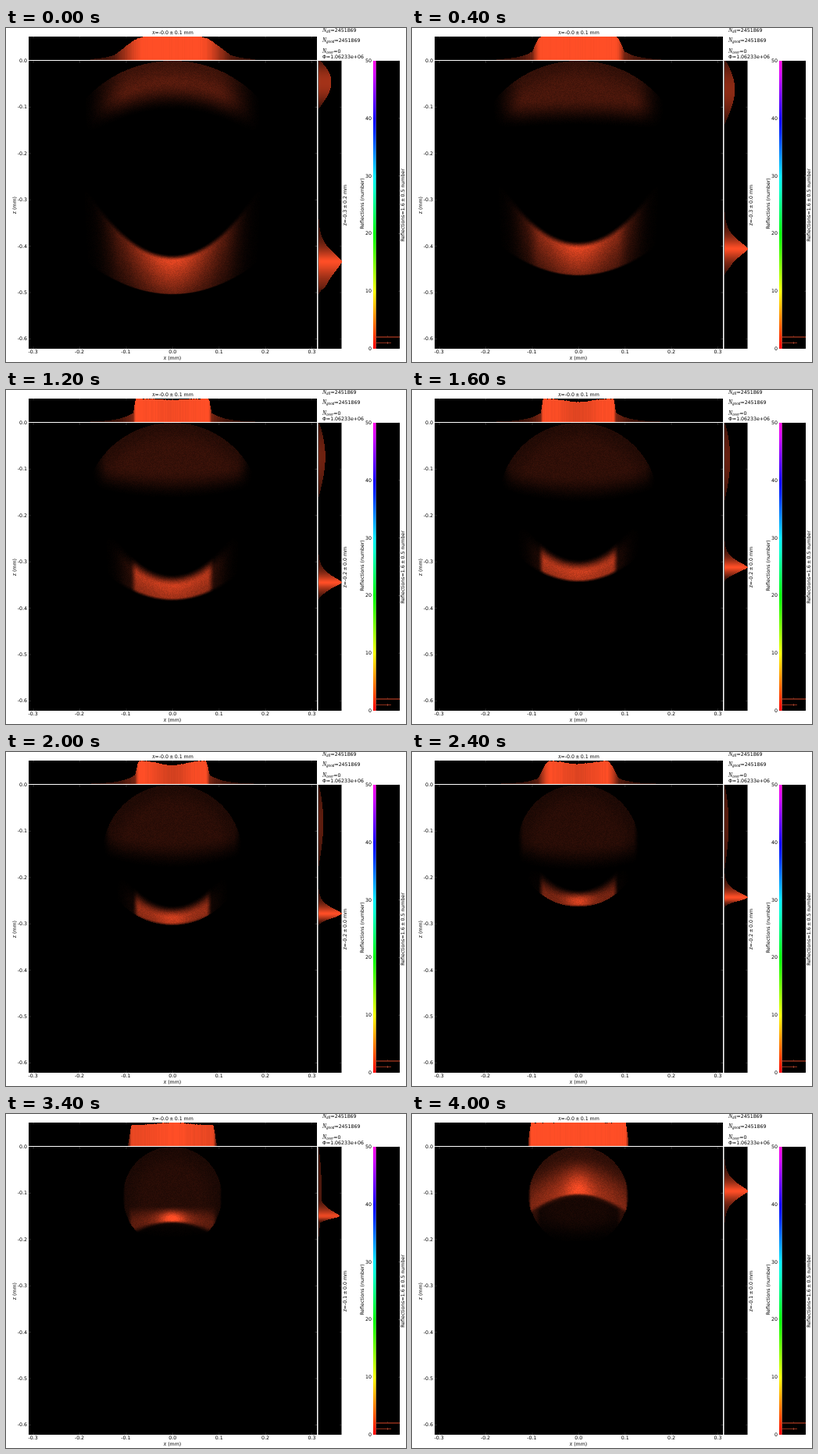
An HTML page with a canvas that plays this animation: 512 px wide and 428 px high, repeating every 4100 ms.

```html
<!DOCTYPE html>
<html lang="en">
<head>
<meta charset="utf-8">
<title>Beam cross-section</title>
<style>
html, body { margin: 0; width: 512px; height: 428px; overflow: hidden; background: #fff; }
svg, canvas { position: absolute; left: 0; top: 0; width: 512px; height: 428px; }
text { font: 6.25px "DejaVu Sans", sans-serif; fill: #000; white-space: pre; }
.m { font: italic 7.5px "Liberation Serif", serif; }
.s { font: italic 5.2px "Liberation Serif", serif; }
.mid { text-anchor: middle; }
.end { text-anchor: end; }
</style>
</head>
<body>
<svg id="plot" viewBox="0 0 512 428">
  <defs><linearGradient id="hues" x1="0" y1="1" x2="0" y2="0"></linearGradient></defs>
  <rect x="29" y="11" width="369" height="30"/>
  <rect x="29" y="42" width="369" height="369"/>
  <rect x="399.5" y="42" width="30" height="369"/>
  <rect x="470" y="42" width="3.7" height="369" fill="url(#hues)"/>
  <rect x="473.7" y="42" width="30.3" height="369"/>
  <path d="M474 396H504" stroke="#d9482a"/>
  <path d="M474 403.5H493" stroke="#8a2d1a"/>
  <path d="M488.5 394.5v1M488.5 402v3" stroke="#a8513c" stroke-width=".7"/>
  <path id="ticks" stroke="#888" stroke-width=".4" fill="none"/>
  <text class="mid" x="213.5" y="8.2"><tspan class="m">x</tspan>=-0.0&#8201;±&#8201;0.1 mm</text>
  <text class="mid" x="213" y="424.5"><tspan class="m">x</tspan> (mm)</text>
  <text class="mid" transform="translate(12.5 227) rotate(-90)"><tspan class="m">z</tspan> (mm)</text>
  <text class="mid" transform="translate(435.8 227) rotate(-90)"><tspan class="m">z</tspan><tspan id="mean"></tspan></text>
  <text class="mid" transform="translate(457.8 225) rotate(-90)">Reflections (number)</text>
  <text class="mid" transform="translate(509.5 227) rotate(-90)">Reflections=1.6&#8201;±&#8201;0.5 number</text>
  <text x="405" y="5.2"><tspan class="m">N</tspan><tspan class="s" dy="1.2">all</tspan><tspan dy="-1.2">=2451869</tspan></text>
  <text x="405" y="18.2"><tspan class="m">N</tspan><tspan class="s" dy="1.2">good</tspan><tspan dy="-1.2">=2451869</tspan></text>
  <text x="405" y="32.2"><tspan class="m">N</tspan><tspan class="s" dy="1.2">over</tspan><tspan dy="-1.2">=0</tspan></text>
  <text x="405" y="39">Φ=1.06233e+06</text>
</svg>
<canvas id="beam" width="512" height="428"></canvas>
<script>
const STEP = 100, STEPS = 41, CX = 213, TOP = 42, UNIT = 59.4;
const NS = 'http://www.w3.org/2000/svg';
const { exp, min, max, abs, sqrt, hypot, sin, round, PI } = Math;
const $ = id => document.getElementById(id);

function add(parent, tag, attrs, text = '') {
  const el = document.createElementNS(NS, tag);
  for (const key in attrs) el.setAttribute(key, attrs[key]);
  el.textContent = text;
  parent.append(el);
}

function buildAxes() {
  const plot = $('plot');
  let d = '';
  for (let i = -3; i <= 3; i++) {
    const x = CX + i * UNIT + .3;
    add(plot, 'text', { class: 'mid', x: x - (i < 0 ? .5 : 0), y: 417.4 }, (i / 10).toFixed(1));
    d += `M${x} 42v2.5M${x} 411v-2.5M${x} 11v2`;
  }
  for (let i = 0; i <= 6; i++) {
    const y = TOP + i * UNIT;
    add(plot, 'text', { class: 'end', x: 27, y: y + 2 }, (i ? '-' : '') + (i / 10).toFixed(1));
    d += `M29 ${y}h2.5M398 ${y}h-2.5M429.5 ${y}h-2`;
  }
  for (let n = 0; n <= 50; n += 10) {
    const y = 411 - n * 7.38;
    add(plot, 'text', { class: 'end', x: 468, y: y + 2 }, n);
    d += `M504 ${y}h-2`;
  }
  $('ticks').setAttribute('d', d);
  for (let i = 0; i <= 20; i++)
    add($('hues'), 'stop', { offset: i / 20, 'stop-color': `hsl(${i * 15.3},100%,50%)` });
}

const mix = (a, b, t) => a + (b - a) * t;
const bell = (x, w) => exp(-((x / w) ** 2));

function smooth(a, b, x) {
  const t = max(0, min(1, (x - a) / (b - a)));
  return t * t * (3 - 2 * t);
}

// Grain in -0.5..0.5, fixed for each pixel and step.
function noise(x, y, k) {
  let h = Math.imul(x + 1, 374761393) ^ Math.imul(y + 7, 668265263) ^ Math.imul(k + 3, 1274126177);
  h = Math.imul(h ^ (h >>> 13), 1103515245);
  h = Math.imul(h ^ (h >>> 16), 2246822519);
  return ((h ^ (h >>> 15)) >>> 0) / 4294967296 - .5;
}

// Beam geometry at step k: from far away (0), through the focus (about 30), to the exit (40).
function beamAt(k) {
  const R = 63 + 6 * Math.log(1 + exp((88 - 3.08 * k) / 6));
  const outer = 342 - 5.92 * k;
  const side = .3 + .55 * bell(k - 14, 10);
  const atExit = smooth(33, 40, k);
  return {
    R, outer, side, atExit,
    outerBend: mix(.5 / R, -.0065, smooth(17, 32, k)),
    inner: outer - 49 * exp(-k / 28),
    innerBend: mix(.0073 + .00015 * k, -.004, smooth(24, 40, k)),
    lift: 3 + 37 * smooth(32, 40, k),
    rise: .12 + .45 * smooth(0, 20, k),
    slope: max(0, .6 - k / 60),
    fall: .04 + .009 * k,
    core: (.95 - side) * (1 - .35 * atExit),
    coreW: 16 + .03 * (k - 30) ** 2,
    half: 47 + .04 * (k - 20) ** 2,
    halfSoft: 4 + 14 * exp(-k / 4),
    halo: .3 * (1 - smooth(0, 30, k)),
    haloLen: 24 - .5 * k,
    faint: .13 + .21 * exp(-k / 12) + .12 * atExit,
    low: 106 + 10 * sqrt(k),
    lowBend: .005 * exp(-k / 6) - .002,
    reach: min(R, 115 - .9 * k),
    reachSoft: 60 * exp(-k / 12),
    peak: outer - 43 * exp(-k / 21),
    up: 11 + .015 * (k - 24) ** 2,
    down: 9.5 + 19 * exp(-k / 5) + 5 * atExit,
    lobe: (.1 + .45 * exp(-k / 14)) * (1 - atExit),
    shoulder: 3 + 26 * exp(-k / 3) + 9 * bell(k - 25, 4),
    tail: .4 * (1 - smooth(20, 32, k)),
    dip: .2 * bell(k - 20, 7) - .12 * bell(k - 33, 4)
  };
}

function faintDisc(b, a, y) {
  const depth = b.R - hypot(a, y - TOP - b.R);
  if (depth < 0) return 0;
  const low = b.low + b.lowBend * a * a;
  const dome = smooth(-4, 4, y - b.outer + b.outerBend * a * a) * (1 - smooth(48, 56, a));
  return b.faint * (.7 + .3 * smooth(0, 30, depth))
    * (1 - smooth(low - 38, low, y))
    * (1 - smooth(b.reach - b.reachSoft, b.reach + .5, a))
    * (1 - .65 * dome);
}

function brightBand(b, a, y) {
  const y0 = b.inner - b.innerBend * a * a;
  const y1 = b.outer - b.outerBend * a * a;
  if (y1 <= y0 || y < y0 - b.lift || y > y1 || hypot(a, y - TOP - b.R) > b.R + 1) return 0;
  const t = max(0, (y - y0) / (y1 - y0));
  const across = smooth(y0 - b.lift, mix(y0, y1, b.rise), y)
    * (1 - b.slope * t) * (1 - smooth(1 - b.fall, 1, t));
  const edge = 1 - smooth(b.half - b.halfSoft, b.half + b.halfSoft, a);
  const halo = b.halo * bell(max(0, a - b.half), b.haloLen) * (1 - edge);
  return across * ((b.core * bell(a, b.coreW) + b.side) * edge + halo);
}

function sideProfile(b, y) {
  const d = y - b.peak;
  const main = exp(-((abs(d) / (d < 0 ? b.up : b.down)) ** 1.4))
    * (1 - (1 - b.atExit) * smooth(b.outer - 12, b.outer + 1, y));
  const t = (y - 40) / (b.low - 42);
  return max(main, t > 0 && t < 1 ? b.lobe * sin(PI * t ** .9) : 0);
}

function topProfile(b, a) {
  if (b.atExit && a > b.R + .5) return 0;
  const edge = 1 - smooth(b.half - b.shoulder, b.half + b.shoulder, a);
  const level = 1 + min(0, b.dip) - b.dip * bell(a, b.half * .5);
  return max(edge * level, b.tail * exp(-max(0, a - b.half) / 18));
}

const ctx = $('beam').getContext('2d');

function draw(k) {
  const b = beamAt(k);
  const img = ctx.createImageData(512, 428);
  const put = (x, y, v) => {
    v = max(0, min(1, v));
    img.data.set([255 * v, 78 * v, 38 * v, 255], (y * 512 + x) * 4);
  };

  for (let y = TOP; y < 345; y++) {
    for (let x = 80; x < 347; x++) {
      const a = abs(x + .5 - CX);
      const v = faintDisc(b, a, y + .5) + brightBand(b, a, y + .5);
      if (v > .004) put(x, y, v + sqrt(v) * .14 * noise(x, y, k));
    }
    const w = sideProfile(b, y + .5);
    for (let i = 0; i < round(30 * w); i++) put(400 + i, y, .2 + .8 * w);
  }

  for (let x = 108; x < 319; x++) {
    const h = topProfile(b, abs(x + .5 - CX));
    const len = round(30 * min(1, h + .03 * h * noise(x, 2, k)));
    const v = .15 + .85 * h + .04 * noise(x, 3, k);
    for (let i = 0; i < len; i++) put(x, 40 - i, v);
  }
  ctx.putImageData(img, 0, 0);

  const mean = k < 12 ? '0.3' : k < 27 ? '0.2' : '0.1';
  $('mean').textContent = `=-${mean}\u2009±\u2009${k < 2 ? '0.2' : '0.0'} mm`;
}

let shown = -1;
const start = performance.now();

function tick() {
  const k = Math.floor(max(0, performance.now() - start) / STEP) % STEPS;
  if (k !== shown) draw(shown = k);
  requestAnimationFrame(tick);
}

buildAxes();
tick();
</script>
</body>
</html>
```
